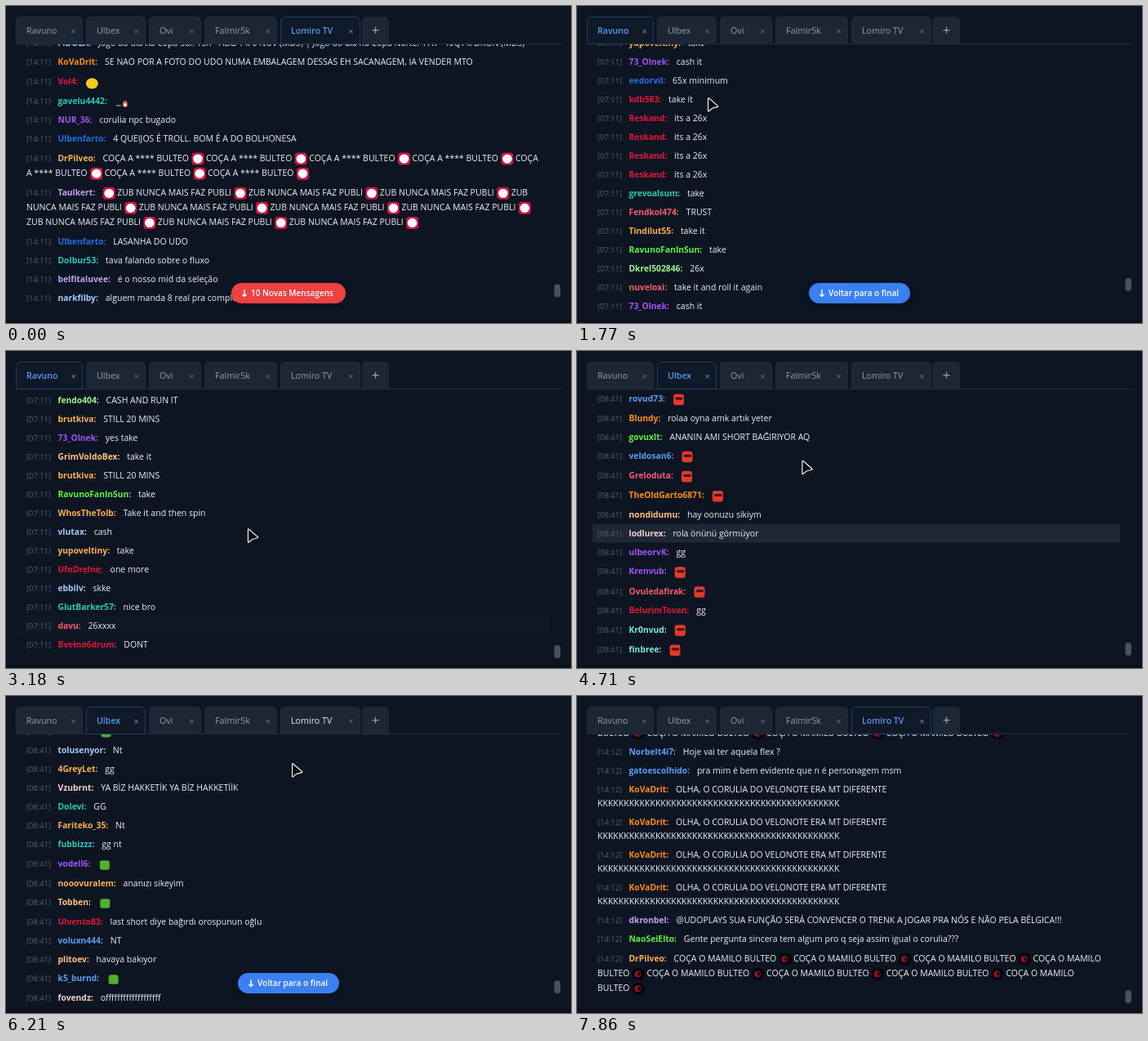
These frames come from a looping animation (692 by 388 pixels, 7.89 s). An HTML page with a canvas:

```html
<!DOCTYPE html>
<html lang="pt">
<head>
<meta charset="utf-8">
<title>Chat</title>
<style>
html, body { margin: 0; width: 100%; height: 100%; overflow: hidden; background: #0d1522; }
canvas { display: block; width: 692px; height: 388px; }
</style>
</head>
<body>
<canvas id="stage"></canvas>
<script>
const W = 692, H = 388, LOOP = 7890;
const canvas = document.getElementById('stage');
const ctx = canvas.getContext('2d');
const dpr = window.devicePixelRatio || 1;
canvas.width = W * dpr;
canvas.height = H * dpr;

const FAMILY = '"Open Sans", "Noto Sans", sans-serif';
const FONT = {
  text: '500 10.5px ' + FAMILY,
  name: 'bold 10.3px ' + FAMILY,
  time: '9.4px ' + FAMILY,
  tab: '500 10.7px ' + FAMILY,
  tabOn: '600 10.6px ' + FAMILY,
  button: '600 10px ' + FAMILY,
};
const COLOR = {
  o: '#ff8c0a', r: '#e0123c', c: '#1fcbb8', p: '#a452f5', b: '#1f6fe5',
  y: '#fbb04a', v: '#c6a0f8', s: '#a9c8f8', k: '#f75a70', g: '#5cf438',
  l: '#a2f58a', d: '#5b9cf2', m: '#80e8de', n: '#ffc47c', h: '#f4cfd0',
};
const PAGE = '#0d1522';
const TOP = 47, BOTTOM = 376;
const LINE = 17, EMOTE_LINE = 18.1, PAD = 6, EMOTE = 15.5;

const times = (s, n) => Array(n).fill(s).join(' ');

// "colour;name;lines;emote" with ~ marking an emote
const row = (s, at = 0) => {
  const [color, name, text, emote] = s.split(';');
  const lines = text.split('\n');
  const lineH = emote ? EMOTE_LINE : LINE;
  return { color: COLOR[color], name, lines, emote, at, lineH, h: PAD + lines.length * lineH };
};
const rows = s => s.trim().split('\n').map(l => row(l.replace(/\\n/g, '\n')));
const filler = (n, names, texts) => Array.from({ length: n }, (_, i) =>
  row(names[i * 3 % names.length] + ';' + texts[i * 5 % texts.length]));

const rub = 'COÇA A **** BULTEO ~', pinch = 'COÇA O MAMILO BULTEO ~';
const ad = 'ZUB NUNCA MAIS FAZ PUBLI ~';
const odd = 'o;KoVaDrit;OLHA, O CORULIA DO VELONOTE ERA MT DIFERENTE\\n' + 'K'.repeat(46);

const ravuno = [
  ...rows(`
y;yupoveltiny;take
p;73_Olnek;cash it
b;eedorvil;65x minimum
r;kdb583;take it
r;Reskand;its a 26x
r;Reskand;its a 26x
r;Reskand;its a 26x
r;Reskand;its a 26x
c;grevoalsum;take
k;Fendkol474;TRUST
y;Tindilut55;take it
g;RavunoFanInSun;take
l;Dkrel502846;26x
k;nuveloxi;take it and roll it again
p;73_Olnek;cash it`),
  ...filler(29, ['y;brutkiva', 'l;fendo404', 'k;nuveloxi', 'c;grevoalsum', 's;vlutax', 'r;Reskand', 'p;73_Olnek'],
    ['take', 'cash it', 'take it', 'TAKE', 'one more', '26x']),
  ...rows(`
l;fendo404;CASH AND RUN IT
y;brutkiva;STILL 20 MINS
p;73_Olnek;yes take
n;GrimVoldoBex;take it
y;brutkiva;STILL 20 MINS
g;RavunoFanInSun;take
y;WhosTheTolb;Take it and then spin
s;vlutax;cash
y;yupoveltiny;take
r;UfoDrelne;one more
s;ebbilv;skke
c;GlutBarker57;nice bro
k;davu;26xxxx
r;Bvelno6drum;DONT`),
  row('y;brutkiva;take it', 3480),
  row('s;vlutax;cash', 3810),
];

const ulbex = rows(`
c;Plovard;~;green
s;tolusenyor;Nt
y;4GreyLet;gg
h;Vzubrnt;YA BİZ HAKKETİK YA BİZ HAKKETİİK
c;Dolevi;GG
y;Fariteko_35;Nt
c;fubbizzz;gg nt
p;vodell6;~;green
y;nooovuralem;ananızı sikeyim
n;Tobben;~;green
r;Ulvento83;last short diye bağırdı orospunun oğlu
d;voluxn444;NT
n;plitoev;havaya bakıyor
d;k5_burnd;~;green
h;fovendz;offfffffffffffffffff
d;rovud73;~;red
o;Blundy;rolaa oyna amk artık yeter
g;govuxlt;ANANIN AMI SHORT BAĞIRIYOR AQ
d;veldosan6;~;red
k;Greloduta;~;red
o;TheOldGarto6871;~;red
n;nondidumu;hay oonuzu sikiym
h;lodlurex;rola önünü görmüyor
p;ulbeorvK;gg
p;Krenvub;~;red
k;Ovuledafirak;~;red
r;BelurimTovan;gg
m;Kr0nvud;~;red
m;finbree;~;red`);

const lomiro = [
  ...rows(`
s;FIDOLA;Jogo do dia na Copa Sul: 15h - ABG 1 x 0 NUV (MD3) | Jogo do dia na Copa Norte: 17h - 40QT x DRON (MD3)
o;KoVaDrit;SE NAO POR A FOTO DO UDO NUMA EMBALAGEM DESSAS EH SACANAGEM, IA VENDER MTO
r;Vol4;~;bird
c;gavelu4442;~;tiny
p;NUR_36;corulia npc bugado
b;Ulbenfarto;4 QUEIJOS É TROLL. BOM É A DO BOLHONESA
y;DrPilveo;${times(rub, 4)} COÇA\\nA **** BULTEO ~ ${times(rub, 2)};ball
v;Taulkert;~ ${times(ad, 3)} ZUB\\nNUNCA MAIS FAZ PUBLI ~ ${times(ad, 3)}\\n${times(ad, 3)};ball
b;Ulbenfarto;LASANHA DO UDO
c;Dolbur53;tava falando sobre o fluxo
v;belfitaluvee;é o nosso mid da seleção
s;narkfilby;alguem manda 8 real pra completar`),
  ...filler(16, ['d;gatoescolhido', 'b;Ulbenfarto', 'c;Dolbur53', 'v;dkronbel'],
    ['kkkkkkkk', 'LASANHA', 'bora time', 'boa tarde chat', 'é hoje']),
  ...rows(`
y;DrPilveo;${times(pinch, 3)} COÇA O MAMILO\\nBULTEO ~ ${times(pinch, 3)};dark
d;Norbelt4i7;Hoje vai ter aquela flex ?
d;gatoescolhido;pra mim é bem evidente que n é personagem msm
${Array(4).fill(odd).join('\n')}
v;dkronbel;@UDOPLAYS SUA FUNÇÃO SERÁ CONVENCER O TRENK A JOGAR PRA NÓS E NÃO PELA BÉLGICA!!!
g;NaoSeiElto;Gente pergunta sincera tem algum pro q seja assim igual o corulia???
y;DrPilveo;${times(pinch, 3)} COÇA O MAMILO\\nBULTEO ~ ${times(pinch, 3)} COÇA O MAMILO\\nBULTEO ~;dark`),
];

// scroll: [time, distance from the end]
const VIEWS = {
  Ravuno: { rows: ravuno, clock: '07:11', end: 370.2, thumb: 360, scroll: [[1250, 0], [1700, 997], [2560, 997], [2900, 0]] },
  Ulbex: { rows: ulbex, clock: '08:41', end: 377, thumb: 357, scroll: [[5200, 0], [5700, 334.2]] },
  'Lomiro TV': { rows: lomiro, end: 369.3, thumb: 360, scroll: [[6880, 721.7], [7000, 0]] },
};
const TABS = [
  { label: 'Ravuno', x: 12, w: 82 }, { label: 'Ulbex', x: 98, w: 73 },
  { label: 'Ovi', x: 175, w: 64 }, { label: 'Falmir5k', x: 243, w: 89 },
  { label: 'Lomiro TV', x: 336, w: 98 },
];
const active = t => t < 1000 || t >= 6380 ? 'Lomiro TV' : t < 4200 ? 'Ravuno' : 'Ulbex';

const PATH = [
  [200, 90, -18], [300, 84, 3], [700, 45, 24], [1050, 45, 26], [1770, 161, 113],
  [2200, 230, 205], [2480, 338, 350], [2700, 336, 349], [2980, 292, 170], [3180, 297, 218],
  [3380, 312, 331], [3550, 300, 325], [3920, 130, 6], [4100, 125, 24], [4400, 128, 26],
  [4710, 276, 134], [4790, 316, 216], [5300, 336, 222], [5950, 346, 180], [6210, 351, 84],
  [6300, 368, 28], [6500, 366, 26], [6800, 327, 352], [7060, 327, 352], [7260, -20, 320],
];
const CALM = [[1900, 2400], [3100, 3230], [4600, 5200]];

const smooth = u => u * u * (3 - 2 * u);
function along(keys, t, ease = u => u) {
  if (t <= keys[0][0]) return keys[0].slice(1);
  for (let i = 1; i < keys.length; i++) {
    const a = keys[i - 1], b = keys[i];
    if (t < b[0]) {
      const u = ease((t - a[0]) / (b[0] - a[0]));
      return a.slice(1).map((v, k) => v + (b[k + 1] - v) * u);
    }
  }
  return keys[keys.length - 1].slice(1);
}

function text(s, x, y, font, color) {
  ctx.font = font;
  ctx.fillStyle = color;
  ctx.fillText(s, x, y);
  return ctx.measureText(s).width;
}
function box(x, y, w, h, r, color) {
  ctx.beginPath();
  ctx.roundRect(x, y, w, h, r);
  ctx.fillStyle = color;
  ctx.fill();
}
function oval(x, y, rx, ry, color, turn = 0) {
  ctx.beginPath();
  ctx.ellipse(x, y, rx, ry, turn, 0, 7);
  ctx.fillStyle = color;
  ctx.fill();
}

const EMOTES = {
  ball(x, y, t) {
    box(x - 7.5, y - 7.5, 15, 15, 4, '#d3123f');
    oval(x + Math.sin(t / 90) * .6, y, 5.8, 5.6, '#fff');
  },
  bird(x, y, t) {
    oval(x, y + 2 + Math.sin(t / 80), 7.5, 6.5, '#f2cf1d');
  },
  tiny(x, y, t) {
    box(x - 6, y + 4, 6, 1.5, 1, '#8b929c');
    oval(x + 5, y + 3 + Math.sin(t / 90) * .5, 3, 4, '#e4573d');
    oval(x + 5, y + 4, 2, 2, '#f4e9e2');
  },
  red(x, y, t) {
    const dx = Math.sin(t / 70) * .5;
    box(x - 6.5 + dx, y - 6.5, 13, 13.5, 3, '#e23a2a');
    box(x - 4 + dx, y - 2.5, 9, 3, 1, '#3a1518');
  },
  green(x, y, t) {
    box(x - 6 + Math.sin(t / 70) * .5, y - 5, 12, 11.5, 3, '#4fb02e');
  },
  dark(x, y, t) {
    const u = .5 + .5 * Math.cos((t - 7020) / LOOP * 28 * Math.PI);
    box(x - 7.5, y - 7.2, 15, 14.5, 6 - 4 * u, '#06060a');
    oval(x - 1 - 2 * u, y, 4 + u * .5, 4 + 3 * u, u > .5 ? '#cf1531' : '#8d1024');
    oval(x + .5 - 3 * u, y, 1.6, 2.4, u > .5 ? '#f0b9c0' : '#16060b');
  },
};

function drawRow(r, top, clock, t) {
  const mid = top + PAD / 2 + r.lineH / 2;
  text('[' + clock + ']', 25, mid + 3.8, FONT.time, '#536071');
  let x = 63.5 + text(r.name + ':', 63.5, mid + 3.8, FONT.name, r.color) + 8.8;
  r.lines.forEach((line, i) => {
    const y = mid + i * r.lineH;
    line.split('~').forEach((part, k) => {
      if (k) {
        EMOTES[r.emote](x + EMOTE / 2 + .5, y + 1, t);
        x += EMOTE;
      }
      if (part) x += text(part, x, y + 3.8, FONT.text, '#eceff4');
    });
    x = 25;
  });
}

function hoverOf(list, t) {
  if (!CALM.some(([a, b]) => t >= a && t < b)) return null;
  const at = s => list.find(p => {
    const y = along(PATH, s)[1] + 2;
    return y >= TOP && y >= p.y && y < p.y + p.r.h;
  });
  const now = at(t + 200);
  if (!now) return null;
  let share = 0;
  for (let k = 0; k < 5; k++) if (at(t + 200 - 30 * k) === now) share += .2;
  return { p: now, share };
}

function drawMessages(view, scroll, t) {
  let y = view.end + scroll;
  const list = [];
  for (let i = view.rows.length - 1; i >= 0; i--) {
    const r = view.rows[i];
    if (r.at > t) continue;
    y -= r.h;
    list.push({ r, y });
  }
  ctx.save();
  ctx.beginPath();
  ctx.rect(0, TOP, W, BOTTOM - TOP);
  ctx.clip();
  const hover = hoverOf(list, t);
  if (hover) {
    ctx.globalAlpha = Math.min(1, hover.share);
    box(19, hover.p.y, 646, hover.p.r.h, 3, '#1d2735');
    ctx.globalAlpha = 1;
  }
  const clock = view.clock || (scroll > 360 ? '14:11' : '14:12');
  for (const p of list) if (p.y < BOTTOM && p.y + p.r.h > 40) drawRow(p.r, p.y, clock, t);
  ctx.restore();
  box(671.5, view.thumb - scroll * .027, 7.5, 16, 3.8, '#4c5058');
}

function drawTabs(current, t) {
  const [hx, hy] = along(PATH, t + 200);
  box(12, 46, 668, 1, 0, '#222e3f');
  for (const tab of TABS) {
    const on = tab.label === current;
    const hot = hy > 13 && hy < 46 && hx > tab.x && hx < tab.x + tab.w;
    box(tab.x, 13, tab.w, 33, [5, 5, 0, 0], on ? '#0f1928' : '#1c2634');
    ctx.beginPath();
    ctx.roundRect(tab.x + .5, 13.5, tab.w - 1, 33, [5, 5, 0, 0]);
    ctx.strokeStyle = on ? '#213c64' : '#202b3a';
    ctx.lineWidth = 1;
    ctx.stroke();
    text(tab.label, tab.x + 13, 33.8, on ? FONT.tabOn : FONT.tab, on ? '#5499f5' : hot ? '#e8ebf0' : '#949dab');
    text('×', tab.x + tab.w - 14.5, 34.5, FONT.tab, on ? '#8791a1' : '#6c7685');
  }
  box(436, 13, 33, 33, [5, 5, 0, 0], '#1c2634');
  box(448.5, 29, 8, 1.2, 0, '#9aa3b0');
  box(451.9, 25.6, 1.2, 8, 0, '#9aa3b0');
}

function drawButton(label, x, w, color) {
  ctx.save();
  ctx.shadowColor = 'rgba(0,0,0,.15)';
  ctx.shadowBlur = 8 * dpr;
  ctx.shadowOffsetY = 3 * dpr;
  box(x, 339, w, 25, 12.5, color);
  ctx.restore();
  ctx.beginPath();
  ctx.moveTo(x + 16, 347);
  ctx.lineTo(x + 16, 355.5);
  ctx.moveTo(x + 13.4, 352.8);
  ctx.lineTo(x + 16, 355.5);
  ctx.lineTo(x + 18.6, 352.8);
  ctx.strokeStyle = '#fff';
  ctx.lineWidth = 1.4;
  ctx.stroke();
  text(label, x + 24, 355.2, FONT.button, '#fff');
}

const ARROW = new Path2D('M0 0 L0 15 L4.3 11.4 L11 9.6 Z');
const HAND = new Path2D('M0 1.2 Q1.3 -.6 2.6 1.2 V6 L8.5 7 Q10.5 7.5 10 10 L8.8 16 H1.8 L-3 10 Q-2.8 8.2 -1 9 L0 10 Z');
function drawCursor(t, hand) {
  const [x, y] = along(PATH, t);
  if (x < -15 || y < -16) return;
  ctx.save();
  ctx.translate(x, y);
  const shape = hand ? HAND : ARROW;
  ctx.lineJoin = 'round';
  ctx.lineWidth = 2.4;
  ctx.strokeStyle = '#f2f2f2';
  ctx.stroke(shape);
  ctx.fillStyle = '#06080c';
  ctx.fill(shape);
  ctx.restore();
}

function draw(t) {
  ctx.setTransform(dpr, 0, 0, dpr, 0, 0);
  box(0, 0, W, H, 0, PAGE);
  box(0, 384, W, 4, 0, '#0a101b');
  const current = active(t), view = VIEWS[current];
  const scroll = along(view.scroll, t, smooth)[0];
  drawMessages(view, scroll, t);
  drawTabs(current, t);
  if (scroll > 30) {
    if (view === VIEWS['Lomiro TV']) drawButton((t < 1000 ? 10 : 26) + ' Novas Mensagens', 276, 140, '#ee4142');
    else drawButton('Voltar para o final', 284, 124, '#3a80f4');
  }
  const [x, y] = along(PATH, t);
  const onTab = y > 13 && y < 46 && x < 470;
  const onButton = y > 339 && x > 276 && x < 416;
  drawCursor(t, onTab || onButton);
}

const start = performance.now();
function tick(now) {
  draw(Math.max(0, now - start) % LOOP);
  requestAnimationFrame(tick);
}
draw(0);
requestAnimationFrame(tick);
</script>
</body>
</html>
```
